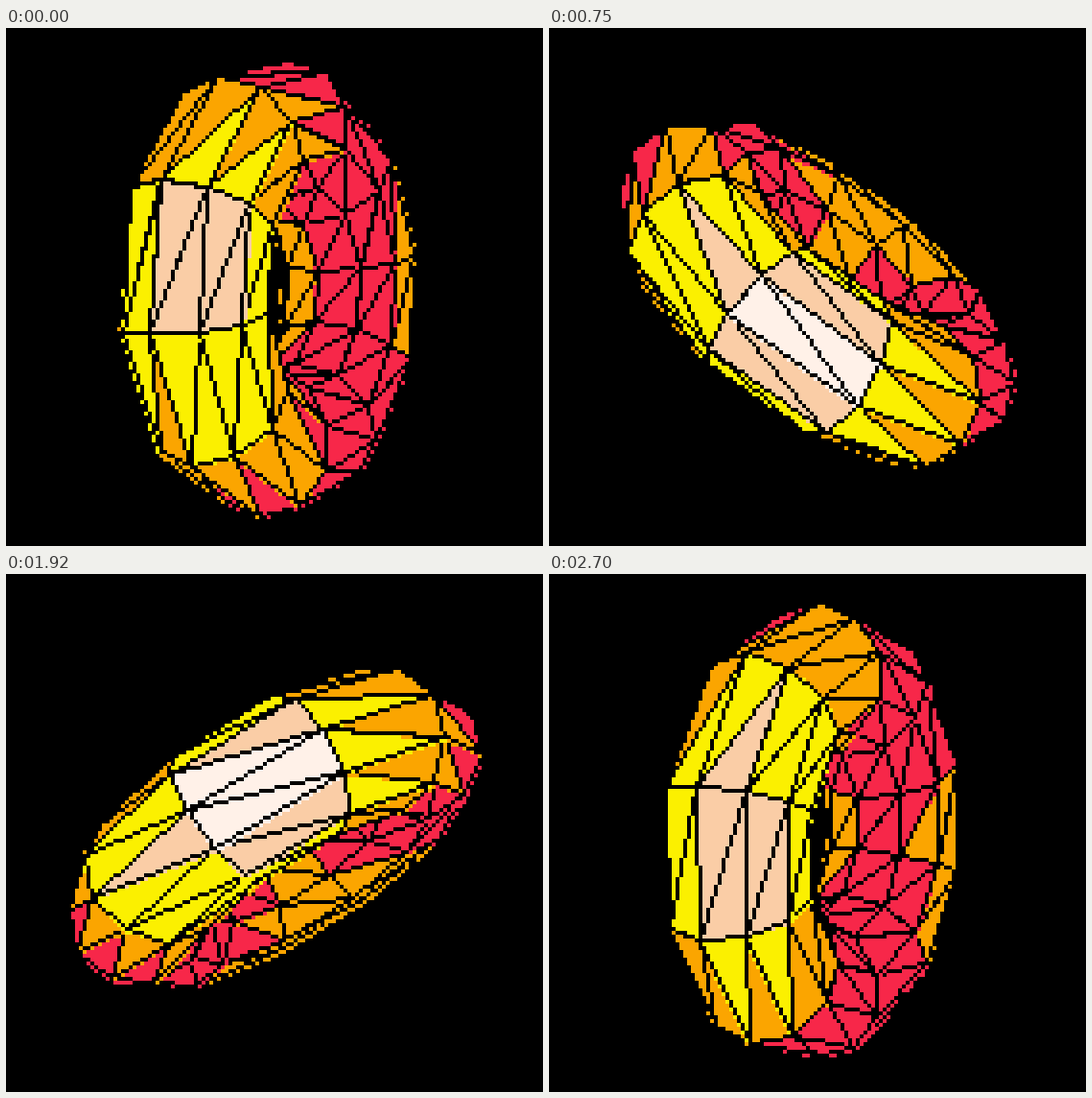
Animation of 560x540 px, one loop 2.76 s. Source, as an HTML page with a canvas:

```html
<!DOCTYPE html>
<html lang="en">
<head>
<meta charset="utf-8">
<title>Tumbling torus</title>
<style>
  html, body { margin: 0; width: 100%; height: 100%; overflow: hidden; background: #000; }
  canvas { display: block; width: 560px; height: 540px; image-rendering: pixelated; }
</style>
</head>
<body>
<canvas id="stage" width="140" height="135"></canvas>
<script>
const ctx = document.getElementById('stage').getContext('2d');
const LOOP = 2760;
const RAD = Math.PI / 180;
const SEG = 10;                    // segments around the ring and around the tube
const RING = 41.3, TUBE = 18.6;
const CAMERA = 550;
const CX = 70.4, CY = 67.5;
const TILT = 30 * RAD, SPIN = 10.9 * RAD, WOBBLE = 0.026;

// Colour by distance from the centre plane, as a share of the outer radius
const SHADES = [[0.88, '#fff1e8'], [0.796, '#facda6'], [0.655, '#fbf000'], [0.316, '#fba500'], [0, '#f72749']];

const shade = z => SHADES.find(([min]) => Math.abs(z) / (RING + TUBE) >= min)[1];

// Pictures change every 60 ms, with one short step that shifts the grid
function frameTime(t) {
  if (t < 30) return 0;
  const start = t < 1920 ? 30 : 1920;
  return start + Math.floor((t - start) / 60) * 60;
}

function projectTorus(theta) {
  const ct = Math.cos(TILT), st = Math.sin(TILT);
  const c = Math.cos(theta), s = Math.sin(theta);
  const wobble = WOBBLE * Math.sin(2 * theta);
  const cw = Math.cos(wobble), sw = Math.sin(wobble);
  const points = [];
  for (let i = 0; i < SEG; i++) {
    const a = SPIN + i * 2 * Math.PI / SEG;
    for (let j = 0; j < SEG; j++) {
      const phi = j * 2 * Math.PI / SEG;
      const rho = RING + TUBE * Math.cos(phi);
      const u0 = rho * Math.cos(a), h0 = TUBE * Math.sin(phi);
      const u = u0 * cw - h0 * sw, h = h0 * cw + u0 * sw;
      const v = rho * Math.sin(a);
      const p = v * s + h * c;
      const x = p * ct - u * st;
      const y = h * s - v * c;
      const z = p * st + u * ct;
      const k = CAMERA / (CAMERA - z);
      points.push({ x: CX + x * k, y: CY - y * k, z });
    }
  }
  return points;
}

function visibleTriangles(points) {
  const at = (i, j) => points[(i % SEG) * SEG + j % SEG];
  const list = [];
  const add = (a, b, c) => {
    const area = (b.x - a.x) * (c.y - a.y) - (b.y - a.y) * (c.x - a.x);
    if (area > 0) list.push({ pts: [a, b, c], z: (a.z + b.z + c.z) / 3 });
  };
  for (let i = 0; i < SEG; i++) {
    for (let j = 0; j < SEG; j++) {
      add(at(i, j), at(i, j + 1), at(i + 1, j));
      add(at(i, j + 1), at(i + 1, j + 1), at(i + 1, j));
    }
  }
  return list.sort((a, b) => a.z - b.z);
}

function edgeX(a, b, y) {
  return b.y === a.y ? b.x : a.x + (b.x - a.x) * (y - a.y) / (b.y - a.y);
}

function fillTriangle(pts) {
  const [a, b, c] = [...pts].sort((p, q) => p.y - q.y);
  for (let row = Math.floor(a.y); row <= Math.floor(c.y); row++) {
    const y = Math.max(a.y, Math.min(c.y, row));
    const x1 = edgeX(a, c, y);
    const x2 = y < b.y ? edgeX(a, b, y) : edgeX(b, c, y);
    const left = Math.floor(Math.min(x1, x2));
    ctx.fillRect(left, row, Math.floor(Math.max(x1, x2)) - left + 1, 1);
  }
}

function drawLine(a, b) {
  let x = Math.floor(a.x), y = Math.floor(a.y);
  const ex = Math.floor(b.x), ey = Math.floor(b.y);
  const dx = Math.abs(ex - x), dy = -Math.abs(ey - y);
  const sx = x < ex ? 1 : -1, sy = y < ey ? 1 : -1;
  let err = dx + dy;
  for (;;) {
    ctx.fillRect(x, y, 1, 1);
    if (x === ex && y === ey) return;
    const e2 = 2 * err;
    if (e2 >= dy) { err += dy; x += sx; }
    if (e2 <= dx) { err += dx; y += sy; }
  }
}

function draw(t) {
  ctx.fillStyle = '#000';
  ctx.fillRect(0, 0, 140, 135);
  for (const { pts, z } of visibleTriangles(projectTorus(Math.PI * t / LOOP))) {
    ctx.fillStyle = shade(z);
    fillTriangle(pts);
    ctx.fillStyle = '#000';
    pts.forEach((p, i) => drawLine(p, pts[(i + 1) % 3]));
  }
}

const begin = performance.now();
let shown = -1;
function tick() {
  const t = frameTime((performance.now() - begin) % LOOP);
  if (t !== shown) draw(shown = t);
  requestAnimationFrame(tick);
}
tick();
</script>
</body>
</html>
```
